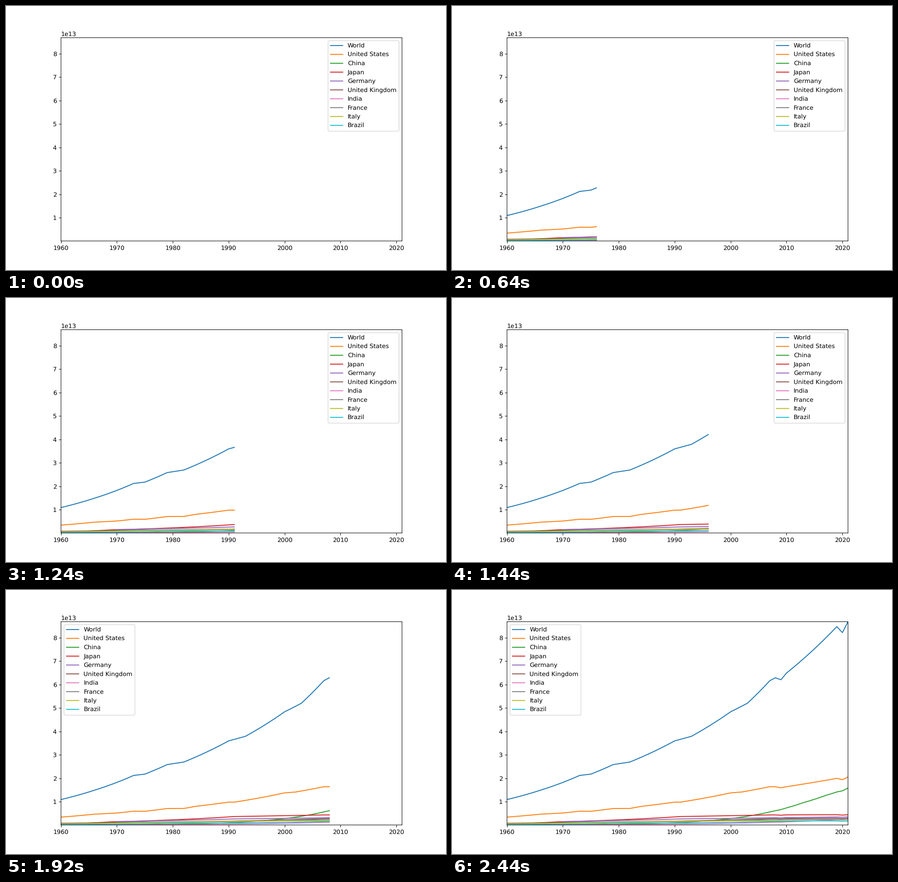
Animation of 966 by 580 pixels, one loop 2480 ms. Source, as a matplotlib script:

```python
import matplotlib.pyplot as plt
import numpy as np
from matplotlib.animation import FuncAnimation

DPI = 96.6
YEARS = np.arange(1960, 2022)
# Shared recessions: share of output lost against the trend.
SLUMPS = {2009: 0.029, 2020: 0.042}

plt.rcParams.update({
    "font.family": "DejaVu Sans",
    "path.snap": False,
    "text.hinting": "none",
})
fig, ax = plt.subplots(figsize=(966.001 / DPI, 580.001 / DPI), dpi=DPI)
lines, series = [], []


def add(name, *turns, slump=1):
    """Compound growth between (year, trillions) turns, less the slumps."""
    when, value = zip(*turns)
    trend = 1e12 * np.exp(np.interp(YEARS, when, np.log(value), left=np.nan))
    for year, loss in SLUMPS.items():
        trend[YEARS == year] *= 1 - slump * loss
    series.append(trend)
    lines.append(ax.plot(YEARS[:1], trend[:1], label=name)[0])


add("World", (1960, 10.95), (1966, 14.95), (1973, 21.25), (1975, 21.8),
    (1979, 25.88), (1982, 26.98), (1990, 36), (1993, 37.95), (2000, 48.4),
    (2003, 52.05), (2007, 61.65), (2008, 62.93), (2010, 64.93),
    (2019, 84.75), (2021, 86.86))
add("United States", (1960, 3.46), (1966, 4.71), (1970, 5.21), (1973, 5.98),
    (1975, 5.94), (1979, 7.13), (1982, 7.16), (1984, 8.03), (1990, 9.85),
    (1991, 9.84), (2000, 13.8), (2002, 14.17), (2007, 16.42), (2010, 16.44),
    (2019, 20), (2021, 20.57))
add("China", (1960, 0.157), (1962, 0.108), (1978, 0.36), (1992, 1.28),
    (2007, 5.67), (2013, 9.63), (2017, 12.7), (2021, 15.85), slump=0.5)
add("Japan", (1960, 0.58), (1969, 1.43), (1975, 1.85), (1991, 3.7),
    (2007, 4.38), (2021, 4.5))
add("Germany", (1970, 1.55), (1991, 2.68), (2008, 3.2), (2021, 3.6))
add("United Kingdom", (1960, 0.82), (1973, 1.26), (1982, 1.34),
    (2007, 2.8), (2021, 3.05), slump=1.5)
add("India", (1960, 0.148), (1980, 0.28), (2000, 0.8), (2021, 2.73))
add("France", (1960, 0.59), (1974, 1.24), (2007, 2.38), (2021, 2.57))
add("Italy", (1960, 0.53), (1974, 1.06), (2000, 1.89), (2021, 1.87))
add("Brazil", (1960, 0.24), (1980, 0.87), (1992, 0.96), (2014, 1.87),
    (2021, 1.85))

ax.set_xlim(YEARS[0], YEARS[-1])
ax.set_ylim(np.nanmin(series), np.nanmax(series))
# "best" lets the legend hop left once the top curve reaches it.
ax.legend(loc="best", labelspacing=0.515)


def draw(i):
    for line, values in zip(lines, series):
        line.set_data(YEARS[:i + 1], values[:i + 1])
    return lines


anim = FuncAnimation(fig, draw, frames=len(YEARS), interval=40,
                     repeat=True, repeat_delay=0, blit=False)
plt.show()
```
